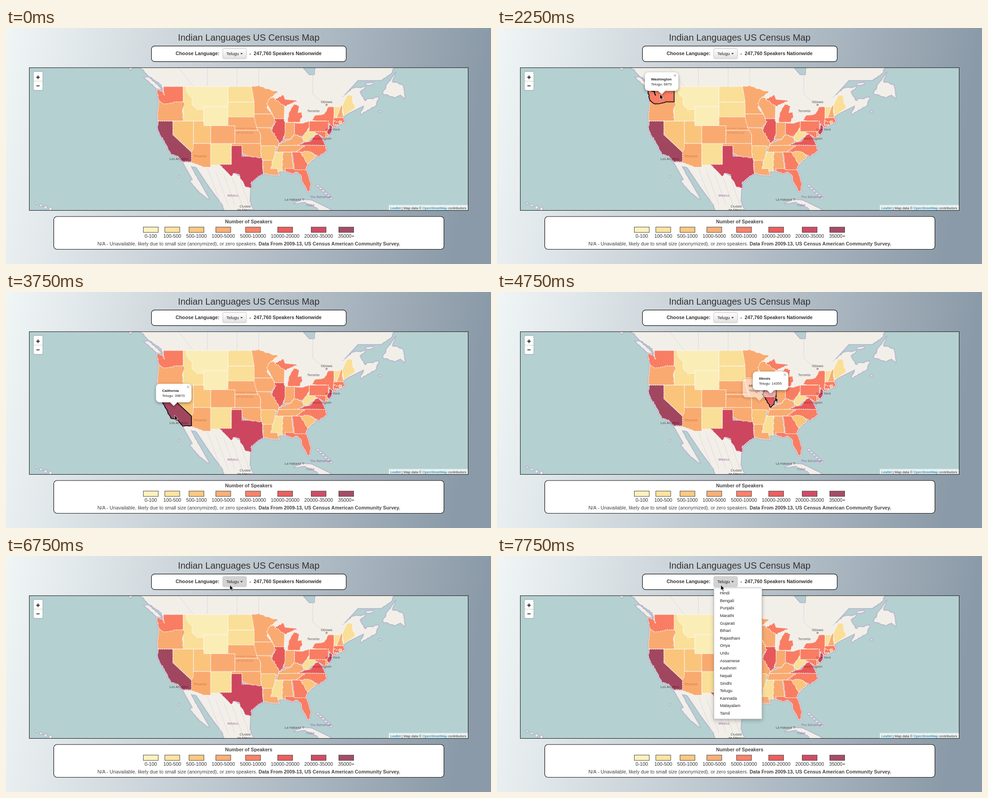
Write an HTML page that moves like this. It is 1072 px wide and 522 px high and loops after 8000 ms.

```html
<!DOCTYPE html>
<html lang="en">
<head>
<meta charset="utf-8">
<title>Indian Languages US Census Map</title>
<style>
html,body{margin:0;width:100%;height:100%;overflow:hidden}
svg{display:block;width:1072px;height:522px;font-family:"Liberation Sans",Arial,sans-serif}
.ui{font-size:10.75px;fill:#333}
.bold{font-weight:bold}
.mid{text-anchor:middle}
.panel{fill:#fff;stroke:#111;stroke-width:1.2}
.small{font-size:9.4px;fill:#222}
.city,.country{font:7.4px "Noto Sans","Open Sans",sans-serif;fill:#4a4a4a}
.country{fill:#95639b}
.dot{fill:#ddd;stroke:#555;stroke-width:.9}
#coast,#bay{stroke:#b7bad0;stroke-width:4.5;stroke-linejoin:round;paint-order:stroke}
#states{opacity:.7}
#states path{stroke:#fff;stroke-width:1.6;stroke-dasharray:2.2 1.9;stroke-linejoin:round}
#outline{fill:none;stroke:#000;stroke-width:1.7;stroke-linejoin:round}
.popup{font-size:8px;fill:#222}
.bubble{fill:#fff;filter:drop-shadow(0 2px 3px rgba(0,0,0,.4))}
#menu rect{fill:#fff;stroke:#bbb;filter:drop-shadow(0 3px 4px rgba(0,0,0,.25))}
</style>
</head>
<body>
<svg viewBox="0 0 1072 522">
<defs>
<linearGradient id="page" gradientUnits="userSpaceOnUse" x1="0" y1="0" x2="1045" y2="170">
<stop offset="0" stop-color="#f0f5f5"/><stop offset=".1" stop-color="#e7edef"/><stop offset="1" stop-color="#8b9aa8"/>
</linearGradient>
<linearGradient id="button" x2="0" y2="1"><stop stop-color="#fff"/><stop offset="1" stop-color="#e1e1e1"/></linearGradient>
<clipPath id="frame"><rect x="52" y="88" width="970" height="315.5"/></clipPath>
</defs>
<rect width="1072" height="522" fill="url(#page)"/>
<text class="mid" x="536.5" y="28" font-size="20.2" fill="#333">Indian Languages US Census Map</text>

<rect class="panel" x="321.5" y="39.8" width="430.5" height="34.6" rx="7"/>
<g class="ui bold"><text x="375" y="59.5">Choose Language:</text><text x="538" y="59.5">-</text><text x="547.5" y="59.5">247,760 Speakers Nationwide</text></g>
<rect id="picker" x="479" y="45.5" width="52.5" height="22.5" rx="3" stroke="#c4c4c4"/>
<text class="small" x="487" y="60">Telugu</text>
<path d="M518 55.5h5.4l-2.7 2.9z" fill="#333"/>

<g clip-path="url(#frame)">
<rect x="52" y="88" width="970" height="316" fill="#b5d0d0"/>
<path id="coast" fill="#f2efe9"/>
<path id="bay" fill="#b5d0d0"/>
<path id="provinces" fill="none" stroke="#dccddd" stroke-width=".8"/>
<g id="labels"></g>
<g id="states"></g>
<path id="outline"/>
<g id="popups"></g>
<rect x="846" y="391.5" width="176" height="12" fill="#fff" fill-opacity=".7"/>
<text x="849.5" y="400.5" font-size="7.7" fill="#333"><tspan fill="#0078a8">Leaflet</tspan> | Map data © <tspan fill="#0078a8">OpenStreetMap</tspan> contributors</text>
<rect x="60.5" y="96" width="21" height="42" rx="3" fill="#fff" stroke="#9fb5b6" stroke-width="1.3"/>
<path d="M61 117.5h20" stroke="#ccc"/>
<path d="M66.7 109h8M70.7 105v8M67.2 128h7" stroke="#000" stroke-width="1.7"/>
</g>
<rect x="51.5" y="87.8" width="970" height="315.7" fill="none" stroke="#111"/>

<rect class="panel" x="105.5" y="417" width="862.5" height="72.5" rx="7"/>
<text class="ui bold mid" x="536.5" y="432" style="fill:#444">Number of Speakers</text>
<g id="legend"></g>
<text class="ui mid" x="536.7" y="481" style="fill:#444">N/A - Unavailable, likely due to small size (anonymized), or zero speakers. <tspan class="bold">Data From 2009-13, US Census American Community Survey.</tspan></text>

<g id="menu"><rect x="479.5" y="70.5" width="106" height="290" rx="2"/></g>
<path id="cursor" d="M0 0V11.3L2.6 8.9 4.5 13.2 6.4 12.4 4.6 8.2H8.1Z" fill="#000" stroke="#fff" stroke-width=".8"/>
</svg>
<script>
const $ = id => document.getElementById(id);
const clamp = v => Math.max(0, Math.min(1, v));
const shades = ['#ffeda0', '#fed976', '#feb24c', '#fd8d3c', '#fc4e2a', '#e31a1c', '#bd0026', '#800026'];

function add(parent, tag, attrs, text) {
  const el = document.createElementNS('http://www.w3.org/2000/svg', tag);
  for (const key in attrs) el.setAttribute(key, attrs[key]);
  if (text) el.textContent = text;
  return parent.appendChild(el);
}

// Web Mercator; places are degrees west, degrees north.
const project = ([west, north]) => [
  1285.6 - 7.64 * west,
  560.1 - 437.7 * Math.log(Math.tan(Math.PI / 4 + north * Math.PI / 360))
].map(v => v.toFixed(1)).join(' ');

// Surveyed borders (along the grid, or very long) stay straight; rivers and shores wander.
function roughen(corners) {
  return corners.flatMap(([w, n], i) => {
    const [w2, n2] = corners[(i + 1) % corners.length];
    const dw = w2 - w, dn = n2 - n, length = Math.hypot(dw, dn);
    const straight = Math.min(Math.abs(dw), Math.abs(dn)) < .12 || length > 5;
    const parts = straight ? 1 : Math.ceil(length / .45);
    return Array.from({ length: parts }, (_, k) => {
      const a = w + dw * k / parts, b = n + dn * k / parts, wander = k ? .13 : 0;
      return [a + wander * Math.sin(40 * b + 17 * a), b + wander * .7 * Math.sin(31 * a - 23 * b)];
    });
  });
}

const parse = places => places.split(',').map(place => place.split(' ').map(Number));
const trace = corners => 'M' + roughen(corners).map(project).join('L') + 'Z';

const shapes = {};
let coast = '';
function land(places) { coast += trace(parse(places)); }
function blob(west, north, rx, ry = rx) {
  coast += trace(Array.from({ length: 9 }, (_, i) => {
    const a = i * Math.PI / 4.5, r = .8 + .3 * Math.sin(i * 5 + west);
    return [west - rx * r * Math.cos(a), north - ry * r * Math.sin(a)];
  }));
}

// Each state covers the ones before it, so a shared border is only spelled out once.
function state(name, shade, places) {
  const d = shapes[name] = trace(parse(places));
  coast += d;
  add($('states'), 'path', { d, fill: shades[shade] });
}
function box(name, shade, west, north, east, south) {
  state(name, shade, `${west} ${north},${east} ${north},${east} ${south},${west} ${south}`);
}

box('Idaho', 1, 117.03, 49, 111.05, 42);
state('Montana', 0, '116.05 49,104.04 49,104.04 45,111.05 45,111.05 44.5,113 44.4,114.5 45.55,114.35 46.65,116.05 48');
state('Oregon', 3, '124 46.2,116.9 46,116.5 45.5,117.2 44.4,117.03 42,124.3 42,124.5 42.8');
state('Washington', 4, '124.7 48.4,123 48.1,122.4 47.3,122.76 49,117.03 49,117.03 46,119 46,121.2 45.65,122.7 45.6,124 46.25');
box('Utah', 2, 114.04, 42, 109.05, 37);
box('Wyoming', 0, 111.05, 45, 104.05, 41);
state('Arizona', 3, '114.8 37,109.05 37,109.05 31.33,111.07 31.33,114.8 32.5');
state('Nevada', 2, '120 42,114.04 42,114.04 36.1,114.63 35,120 39');
state('California', 7, '124.2 42,120 42,120 39,114.63 35,114.6 32.7,117.1 32.55,118.5 34,120.6 34.5,122.5 37.6,123.8 39,124.4 40.4');
box('New Mexico', 1, 109.05, 37, 103.05, 31.8);
box('North Dakota', 1, 104.04, 49, 96.6, 45.94);
box('Nebraska', 3, 104.05, 43, 95.4, 40);
box('South Dakota', 1, 104.04, 45.94, 96.45, 42.9);
box('Colorado', 3, 109.05, 41, 102.05, 37);
box('Kansas', 3, 102.05, 40, 94.62, 37);
state('Texas', 6, '103.05 36.5,100 36.5,100 34,94.04 34,94.04 32,93.7 29.8,95.9 28.6,97.4 27.3,97.15 25.95,99.1 26.4,101 29.6,102.5 29.8,103.15 29,104.9 30.6,106.6 32,103.05 32');
state('Oklahoma', 3, '103 37,94.5 37,94.48 33.65,97.2 33.8,100 34.56,100 36.5,103 36.5');
state('Minnesota', 3, '97.23 49,95.15 49.2,93 48.6,89.6 48,92.2 46.5,92.8 44.75,91.2 43.5,96.45 43.5,96.5 46');
state('Iowa', 3, '96.5 43.5,91.2 43.5,90.2 41.9,91.5 40.6,95.8 40.6');
state('Arkansas', 2, '94.62 36.5,89.8 36.5,91.15 33,94.04 33,94.45 34');
state('Missouri', 3, '95.8 40.6,91.6 40.5,90.2 38.7,89.2 37,89.7 36,90.3 36.5,94.62 36.5,94.62 39');
state('Louisiana', 3, '94.04 33,91.1 33,91.6 31,89.7 31,89.2 29.2,91.3 29.4,93.8 29.7');
state('Mississippi', 1, '90.3 35,88.2 35,88.4 30.35,89.6 30.2,89.7 31,91.6 31,91.1 33');
state('Alabama', 3, '88.2 35,85.6 35,85 31,87.5 31,87.5 30.3,88.4 30.3');
state('Kentucky', 3, '89.4 36.5,89.1 37,86 38,84.8 39.1,82.6 38.4,82 37.5,83.7 36.55');
state('Tennessee', 3, '89.5 36.5,81.7 36.6,84.3 35,90.2 35');
state('Wisconsin', 3, '92.8 45.6,92.2 46.6,90.8 46.9,88.1 45.9,87.7 45,87.8 42.5,90.6 42.5,91.2 43.6');
state('Illinois', 5, '90.65 42.5,87.8 42.5,87.53 41.7,87.53 39.4,88.1 37.8,89.1 37,90.2 38.6,91.5 40,90.2 41.9');
state('Indiana', 3, '87.53 41.7,84.8 41.7,84.8 39.1,86 38,88 37.9,87.53 39.4');
state('Michigan', 4, '86.8 41.76,86.5 43.7,85 45.6,83.4 45.2,83.8 43.8,82.7 43.9,82.5 43,83.45 41.73');
state('Upper Peninsula', 4, '90.4 46.5,88 47.4,87.5 46.5,84 46.2,87.6 45.1');
state('Ohio', 4, '84.8 41.7,82.7 41.5,80.52 42,80.52 40.6,82.4 38.5,84.8 39.1');
state('West Virginia', 1, '80.6 40.6,80.52 39.7,77.8 39.6,79.7 38.4,81.5 37.2,82.6 38.3');
state('Virginia', 5, '77.8 39.3,77 38.4,75.9 36.55,83.7 36.6,81.8 37.3,80.3 37.5,79 38.8');
state('Maryland', 4, '79.48 39.72,75.7 39.72,75.1 38.4,76.3 38.2,77.2 38.9');
box('Delaware', 3, 75.8, 39.8, 75.1, 38.45);
state('New York', 4, '79.76 42.2,78.9 43.2,76.2 43.55,75 45,73.35 45,73.4 42,73.6 41.1,72 41,74 40.6,75.3 41.9');
box('Pennsylvania', 4, 80.52, 42, 75, 39.72);
state('New Jersey', 6, '74.7 41.36,73.9 41,74 40,74.9 38.95,75.4 39.6,74.8 40.3');
box('Connecticut', 4, 73.5, 42.04, 71.8, 41.2);
state('Massachusetts', 4, '73.4 42.73,70.8 42.8,70 41.7,71.2 41.6,73.5 42.04');
box('Rhode Island', 2, 71.8, 42.02, 71.2, 41.4);
state('Vermont', 1, '73.35 45,71.5 45,72.5 42.73,73.3 42.73');
state('New Hampshire', 3, '71.5 45,71 45.3,70.8 42.8,72.5 42.73');
state('Maine', 1, '71 45.3,70 46.7,69.2 47.4,68.2 47.3,67.8 45.7,67 44.8,70.7 43.1');
state('North Carolina', 4, '84.3 35,81.7 36.6,75.9 36.55,75.5 35.2,77.9 33.9,79.7 34.8,83.1 35');
state('South Carolina', 2, '83.1 35,81 35.2,79.7 34.8,78.6 33.9,80.9 32.05');
state('Georgia', 4, '85.6 35,83.1 35,81 32,81.5 30.6,84.85 30.7,85.1 32.5');
state('Florida', 4, '87.6 31,85 31,84.85 30.7,81.5 30.7,80 27,80.4 25.2,81.1 25.2,82.7 27.8,82.8 29.1,84 30.1,85.3 29.7,87.5 30.3');

// Canada, Mexico, then islands
land('130 53,55.7 53,57 51.4,60 50.2,66.5 50.2,71.2 46.8,68 48.6,64.3 48.9,66 48,64.5 46.2,60.5 46.9,61.5 45.2,65.6 43.5,64.7 45.3,70.7 43.2,82 41,117 43,122.7 47.5,123.3 49.4,127 51');
land('107 32,97.5 27.5,97.8 22.5,96.3 19.5,105 19,105.5 21.5,109.3 26.2,113.1 31.2,114.8 31.7,112.5 27.9,109.5 23.1,112.1 24.8,115 27.8,114.2 28.2,117.1 32.6');
land('128.3 50.7,127 50.7,123.4 48.5,124.7 48.6');
land('55.6 51.6,56.6 49.9,53.6 49.3,52.9 46.7,54 47.4,55.8 46.9,59.2 47.7,57.8 49.5');
land('84.9 21.9,82.5 23.1,79.5 22.6,74.2 20.2,77.5 19.8,78.5 21,82 22.4');
blob(131.9, 53, .7, 1.1);
blob(63, 49.5, 1.2, .25);
blob(63.2, 46.45, .8, .25);
blob(118.3, 29, .2);
blob(60, 44, .4, .1);
for (let i = 0; i < 4; i++) blob(159.5 - 1.35 * i, 22 - .55 * i, .25 + .09 * i);
for (let i = 0; i < 6; i++) blob(78 - .75 * i, 26.6 - .65 * i, .4, .25);

$('coast').setAttribute('d', coast);
$('bay').setAttribute('d', trace(parse('82.2 53,82 52.4,80.5 51.3,79.2 51.3,79 53')));
const line = (...ends) => 'M' + ends.map(project).join('L');
let provinces = line([119, 53], [114.07, 49]) + line([79.5, 51.3], [79.5, 47.5], [76, 45.5]);
for (const west of [110, 101.4, 95.15]) provinces += line([west, 53], [west, 49]);
for (let i = 0; i < 5; i++) provinces += line([110 - 2.4 * i, 31 - .8 * i], [106 - 2 * i, 21.5]);
$('provinces').setAttribute('d', provinces);

function label(text, x, y, kind = 'city') { add($('labels'), 'text', { class: kind + ' mid', x, y }, text); }
label('Ottawa', 708.5, 166); label('Toronto', 679.5, 186); label('New York', 721.5, 227);
label('Washington', 698.5, 247); label('Los Angeles', 382, 292); label('Phoenix', 429, 286);
label('Ciudad', 528.5, 396.5); label('de México', 528.5, 405); label('La Habana', 634.5, 382);
label('United States', 530, 224.5, 'country'); label('of America', 528, 233.5, 'country');
label('México', 501.5, 373, 'country'); label('Cuba', 672.5, 394, 'country'); label('The Bahamas', 695.5, 375.5, 'country');
for (const [cx, cy] of [[708.5, 170], [657, 379]]) add($('labels'), 'circle', { class: 'dot', cx, cy, r: 1.7 });

[['0-100', 320], ['100-500', 367.5], ['500-1000', 421], ['1000-5000', 480.3], ['5000-10000', 546], ['10000-20000', 617], ['20000-35000', 691], ['35000+', 752]]
  .forEach(([range, x], i) => {
    add($('legend'), 'rect', { x: x - 16.5, y: 440.3, width: 33, height: 11.8, fill: shades[i], 'fill-opacity': .7, stroke: '#444' });
    add($('legend'), 'text', { class: 'ui mid', x, y: 464 }, range);
  });

'Hindi Bengali Punjabi Marathi Gujarati Bihari Rajasthani Oriya Urdu Assamese Kashmiri Nepali Sindhi Telugu Kannada Malayalam Tamil'
  .split(' ').forEach((name, i) => add($('menu'), 'text', { class: 'small', x: 492.7, y: 85 + 16.63 * i }, name));

const visits = [];
function visit(name, speakers, x, y, opens, closes) {
  const w = 56.5 + 4.4 * speakers.length, left = -w / 2;
  const g = add($('popups'), 'g', { class: 'popup', transform: `translate(${x} ${y})` });
  add(g, 'path', { class: 'bubble', d: `M${left + 8}-49H${-left - 8}a8 8 0 0 1 8 8V-16a8 8 0 0 1-8 8H8L0 0-8-8H${left + 8}a8 8 0 0 1-8-8V-41a8 8 0 0 1 8-8Z` });
  add(g, 'text', { class: 'bold', x: left + 13.5, y: -31.5 }, name);
  add(g, 'text', { x: left + 13.5, y: -20.3 }, 'Telugu: ' + speakers);
  add(g, 'path', { d: `M${-left - 10}-44.5l5 5m0-5l-5 5`, stroke: '#bbb', 'stroke-width': 1.4 });
  visits.push({ name, g, opens, closes });
}
visit('Washington', '6870', 364, 147, 1900, 3150);
visit('Nevada', '865', 393, 232, 3140, 3380);
visit('California', '39870', 370.7, 252, 3300, 4400);
visit('Missouri', '3810', 580, 241, 4510, 4650);
visit('Illinois', '14355', 604.7, 225, 4550, 4800);
visit('Indiana', '2130', 627, 226, 4800, 6130);

// Pointer stops: time, x, y
const stops = [
  [250, 504.5, 56.5], [500, 500.5, 59], [750, 498.5, 53.5], [1500, 443.5, 41.5], [1750, 358, 102],
  [2000, 359, 139], [2250, 360, 146.5], [3250, 385, 230], [3500, 372.5, 272.5], [4500, 576, 269],
  [4750, 614.5, 232], [5000, 616, 231], [5750, 616, 229], [6250, 552, 127], [6500, 497, 68], [6750, 494.8, 64.3]
];
const fade = 200, tickLength = 250;

function render(now) {
  const time = Math.floor(now % 8000 / tickLength) * tickLength;
  const stop = stops.filter(([t]) => t <= time).pop();
  $('cursor').style.display = stop ? '' : 'none';
  if (stop) $('cursor').setAttribute('transform', `translate(${stop[1]} ${stop[2]})`);

  for (const { g, opens, closes } of visits) {
    const opacity = clamp((time - opens) / fade) * clamp(1 - (time - closes) / fade);
    g.style.display = opacity ? '' : 'none';
    g.style.opacity = opacity;
  }
  const hovered = visits.find(v => time > v.opens + fade / 2 && time < v.closes);
  $('outline').setAttribute('d', hovered ? shapes[hovered.name] : '');

  $('picker').setAttribute('fill', time >= 6750 ? '#d3d3d3' : time >= 6500 ? '#e4e4e4' : 'url(#button)');
  $('menu').style.display = time >= 7000 ? '' : 'none';
}

const start = performance.now();
function tick() {
  render(performance.now() - start);
  requestAnimationFrame(tick);
}
tick();
</script>
</body>
</html>
```
